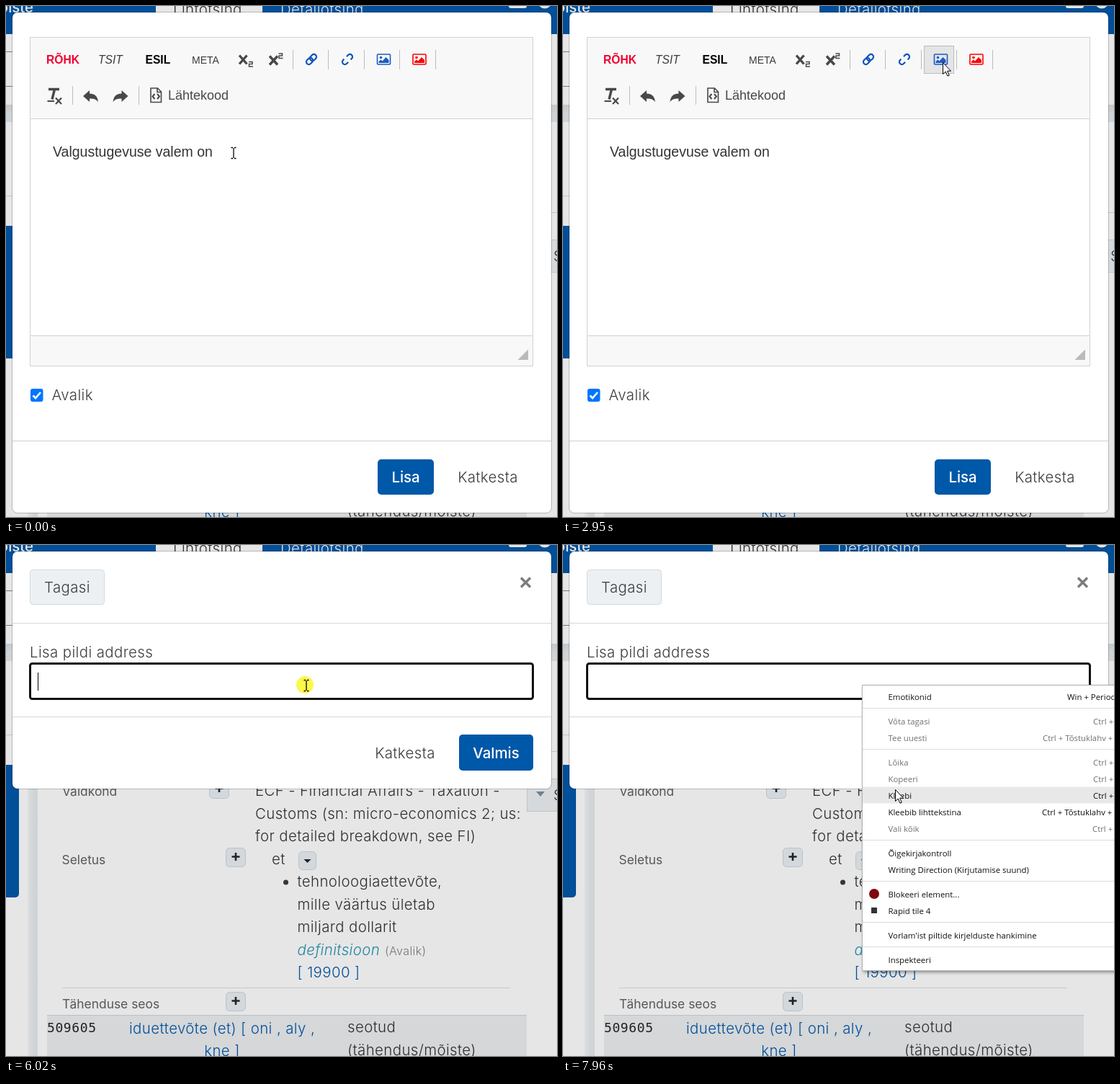
An HTML page that plays this animation: 765 px wide and 709 px high, repeating every 8 s.

```html
<!DOCTYPE html>
<html lang="et">
<head>
<meta charset="utf-8">
<title>Pildi lisamine</title>
<style>
  html, body { margin: 0; width: 100%; height: 100%; overflow: hidden; background: #e6e6e6; }
  svg { display: block; width: 765px; height: 709px; }
  text { font: 350 20.4px Inter, sans-serif; font-optical-sizing: none; letter-spacing: .4px; fill: #3a3c3e; white-space: pre; }
  .label, .strong, .editor text, .menu text { letter-spacing: 0; font-weight: 400; }
  .mid { text-anchor: middle; }
  .white { fill: #fff; }
  .strong { font-weight: 500; }
  .label { font-size: 17.4px; }
  .page text { fill: #2c2f32; }
  .page .label { fill: #55585a; }
  .page .link { fill: #004f98; }
  .page .head { fill: #e6e6e6; }
  .page .def { fill: #1f86a0; font-style: italic; }
  .page .note { font-size: 16px; fill: #707477; }
  .page .code { font: 18px "DejaVu Sans Mono", monospace; letter-spacing: .6px; fill: #222; }
  .editor text { font-family: "Liberation Sans", Arial, sans-serif; }
  .editor .tool { font-size: 15.6px; }
  .editor .bold { font-weight: bold; }
  .menu text { font: 11.4px "Open Sans", sans-serif; fill: #111; }
  .menu .off { fill: #707070; }
  .line { fill: none; stroke: #d1d1d1; }
  .sep { fill: none; stroke: #bcbcbc; }
  .rule { stroke: #d0d9df; }
  .chip { fill: #d3d8dc; stroke: #b8c3cb; }
  .icon { fill: none; stroke: #484848; stroke-width: 2; }
  .panel { fill: #fff; }
  .frame { fill: none; stroke: #000; stroke-opacity: .2; }
</style>
</head>
<body>
<svg viewBox="0 0 765 709">
  <defs>
    <linearGradient id="band" x2="0" y2="1">
      <stop stop-color="#c4c6c8"/><stop offset=".5" stop-color="#ced3d7"/>
    </linearGradient>
    <linearGradient id="gutter">
      <stop stop-color="#dcdee0"/><stop offset=".5" stop-color="#d2d5d7"/><stop offset="1" stop-color="#cfd3d5"/>
    </linearGradient>
    <filter id="shadow" x="-5%" y="-5%" width="115%" height="115%">
      <feDropShadow dx="2" dy="2" stdDeviation="2" flood-opacity=".4"/>
    </filter>
    <g id="plus">
      <rect class="chip" x=".5" y=".5" width="27" height="26" rx="5"/>
      <path d="M14 7v11M8.5 12.5h11" stroke="#222" stroke-width="2.6"/>
    </g>
    <g id="picture">
      <rect x="1" y="1" width="18" height="14" rx="1" fill="none" stroke="currentColor" stroke-width="1.6"/>
      <circle cx="6" cy="5.5" r="1.8" fill="currentColor"/>
      <path d="M3 13V11L6 8.5L8 10.5L13 5L17 9V13Z" fill="currentColor"/>
    </g>
    <path id="reply" d="M0 8L9 0V4.5C16 4.5 20 8 21 16C18 12 14 11 9 11.5V16Z" fill="#484848"/>
  </defs>

  <g class="page">
    <rect width="765" height="709" fill="#e6e6e6"/>
    <rect width="765" height="39" fill="#004f98"/>
    <path d="M208 0h148v39H208z" fill="#e6e6e6"/>
    <text class="head strong" x="38" y="9" text-anchor="end">mõiste</text>
    <text x="232" y="12">Lihtotsing</text>
    <text class="head" x="381" y="12">Detailotsing</text>
    <rect x="698" y="-12" width="25" height="15" rx="3" fill="#e6e6e6"/>
    <circle cx="748" cy="-6" r="9.5" fill="#e6e6e6"/>
    <path d="M0 63.5H20M0 111.5H20" stroke="#777"/>
    <rect y="137" width="765" height="24" fill="url(#band)"/>
    <path d="M0 263.5H30M745 286.5H765" stroke="#c0c4c7"/>
    <path d="M0 305H18V484a5 5 0 0 1-5 5H0z" fill="#004f98"/>
    <rect x="30" y="161" width="14" height="548" fill="url(#gutter)"/>
    <rect x="723.5" y="324.5" width="60" height="45" fill="#d5d9dc" stroke="#bec5ca"/>
    <path d="M736 342h12l-6 7z" fill="#70818c"/>
    <text x="760" y="354">S</text>

    <text class="label" x="78" y="348">Valdkond</text>
    <use href="#plus" x="282" y="325"/>
    <text x="346" y="348">ECF - Financial Affairs - Taxation -</text>
    <text x="346" y="380">Customs (sn: micro-economics 2; us:</text>
    <text x="346" y="411">for detailed breakdown, see FI)</text>
    <text class="label" x="77.5" y="443">Seletus</text>
    <use href="#plus" x="305" y="420"/>
    <text x="369" y="443">et</text>
    <rect class="chip" x="406.5" y="425.5" width="24" height="25" rx="5"/>
    <path d="M413.5 436h10l-5 5z" fill="#222"/>
    <circle cx="388.5" cy="468" r="3.5" fill="#33373a"/>
    <text x="404.5" y="474">tehnoloogiaettevõte,</text>
    <text x="404.5" y="505.5">mille väärtus ületab</text>
    <text x="404.5" y="537">miljard dollarit</text>
    <text class="def" x="404.5" y="569">definitsioon</text>
    <text class="note" x="526" y="569">(Avalik)</text>
    <text class="link" x="404.5" y="600">[ 19900 ]</text>
    <path d="M78 614.5H700" stroke="#c3c8cb"/>
    <text class="label" x="78" y="643">Tähenduse seos</text>
    <use href="#plus" x="305" y="620"/>
    <rect x="57" y="653" width="666" height="56" fill="#d5d7d9"/>
    <path d="M57 652.5H723" stroke="#b4c2cc"/>
    <text class="code" x="57" y="676">509605</text>
    <text class="link mid" x="300" y="678">iduettevõte (et) [ oni , aly ,</text>
    <text class="link mid" x="300" y="709">kne ]</text>
    <text x="474" y="676">seotud</text>
    <text x="474" y="708">(tähendus/mõiste)</text>
  </g>

  <g id="editorDialog">
    <rect class="panel" x="9" y="9" width="748" height="694" rx="7"/>
    <rect class="frame" x="8.5" y="8.5" width="749" height="695" rx="7.5"/>
    <path d="M34 44H731V156H34zM34 458H731V499H34z" fill="#f8f8f8"/>
    <path class="line" d="M33.5 43.5H731.5V499.5H33.5zM34 156.5H731M34 457.5H731"/>
    <path d="M725 476.5V491H710.5z" fill="#bababa"/>
    <path class="sep" d="M398.5 61v27M447.5 61v27M497.5 61v27M546.5 61v27M596.5 61v27M92.5 111v26M184.5 111v26"/>
    <g class="editor">
      <text class="tool bold" x="56" y="80" style="fill:#f00030">RÕHK</text>
      <text class="tool" x="128" y="80" style="font-style:italic">TSIT</text>
      <text class="tool bold" x="193.5" y="80" style="fill:#000">ESIL</text>
      <text x="258" y="80" style="font-size:14px">META</text>
      <text x="225" y="130" style="font-size:18px;fill:#484848">Lähtekood</text>
      <text x="65" y="209" style="font-size:19.5px;fill:#333">Valgustugevuse valem on</text>
    </g>
    <g class="icon">
      <path d="M324 68.5L334.5 80.5M334.5 68.5L324 80.5M366 69.5L377 81.5M377 69.5L366 81.5" stroke-width="3.4"/>
      <path d="M337 77.5h5v3h-4.5v3.5h5.5M378.5 66h5v3h-4.5v3.5h5.5" stroke-width="1.5"/>
      <path d="M59 115.5H74M67.5 115.5L64 129.5" stroke-width="3.4"/>
      <path d="M57.5 132H67M69 127.5L77 136M77 127.5L69 136" stroke-width="2.2"/>
      <path d="M201 114H210.5L215.5 119V133.5H201zM210 114V119.5H215.5" stroke-width="1.6"/>
      <path d="M206.5 122L203.5 125.5L206.5 129M210 122L213 125.5L210 129"/>
    </g>
    <g fill="none" stroke="#0f55bd" stroke-width="2.2">
      <g transform="translate(424 74) rotate(-45)">
        <rect x="-8.5" y="-3.5" width="10" height="7" rx="3.5"/>
        <rect x="-1.5" y="-3.5" width="10" height="7" rx="3.5"/>
      </g>
      <g transform="translate(474 74) rotate(-45)">
        <path d="M-3 -3.5H-5a3.5 3.5 0 0 0 0 7H-2M2 -3.5H5a3.5 3.5 0 0 1 0 7H3"/>
      </g>
    </g>
    <use href="#reply" x="107" y="117"/>
    <use href="#reply" transform="translate(169.5 117) scale(-1 1)"/>
    <rect id="toolHover" x="501.5" y="55.5" width="41" height="38" fill="#e5e5e5" stroke="#bcbcbc"/>
    <use href="#picture" x="514.5" y="66" color="#1a5bc4"/>
    <use href="#picture" x="564" y="66" color="#f00"/>
    <path id="editorCaret" d="M292.5 191v22" stroke="#000"/>
    <rect x="34" y="531" width="17.5" height="18" rx="3" fill="#0075ff"/>
    <path d="M37.5 540.5l3.5 3.5l7-8" fill="none" stroke="#fff" stroke-width="2.6"/>
    <text x="63.5" y="547">Avalik</text>
    <path class="line" d="M9 603.5H757"/>
    <rect x="516" y="629" width="78" height="49" rx="5" fill="#0058a9"/>
    <text class="white strong mid" x="555" y="661">Lisa</text>
    <text class="mid" x="669" y="661">Katkesta</text>
  </g>

  <g id="addressDialog">
    <rect class="panel" x="9" y="9" width="748" height="329" rx="7"/>
    <rect class="frame" x="8.5" y="8.5" width="749" height="330" rx="7.5"/>
    <path class="rule" d="M9 108.5H757M9 238.5H757"/>
    <rect x="33.5" y="34.5" width="103" height="48" rx="4" fill="#edf0f2" stroke="#cddae1"/>
    <text class="mid" x="85" y="66">Tagasi</text>
    <path d="M715 45.5L728 58.5M728 45.5L715 58.5" stroke="#7c7c7c" stroke-width="3.4"/>
    <text x="33" y="156">Lisa pildi address</text>
    <rect id="plainField" x="33.5" y="164.5" width="698" height="49" rx="3" fill="#fff" stroke="#666"/>
    <rect id="focusField" x="33.5" y="164.5" width="698" height="49" rx="3" fill="#fff" stroke="#101010" stroke-width="3"/>
    <path id="fieldCaret" d="M44.5 177v25" stroke="#000"/>
    <text class="mid" x="554" y="296">Katkesta</text>
    <rect x="629" y="263" width="103" height="50" rx="5" fill="#0058a9"/>
    <text class="white strong mid" x="680.5" y="296">Valmis</text>
  </g>

  <g id="menu" class="menu">
    <rect x="415.5" y="194.5" width="380" height="396" fill="#fff" stroke="#b4b4b4" filter="url(#shadow)"/>
    <rect id="rowHover" x="416" width="349" height="23" fill="#e8e8e8"/>
    <path d="M416 226.5H765M416 283.5H765M416 409.5H765M416 466.5H765M416 523.5H765M416 557.5H765" stroke="#dcdcdc"/>
    <circle cx="432" cy="484" r="7" fill="#800610"/>
    <rect x="428" y="503" width="8" height="8" fill="#333"/>
  </g>

  <circle id="glow" r="12" fill="#fbf84c" style="mix-blend-mode:multiply"/>
  <g id="pointer">
    <path id="arrow" d="M.5 .5V16.5L4.2 13L7 19.2L9.3 18.2L6.6 12.2H11.5Z" fill="#fff" stroke="#000"/>
    <path id="beam" d="M-1.5 -6.5H1M3 -6.5H5.5M2 -6V8M-1.5 8.5H1M3 8.5H5.5" stroke="#000" stroke-width="1.3"/>
  </g>
</svg>
<script>
const LOOP = 8000;
const el = id => document.getElementById(id);
const show = (id, on) => el(id).style.display = on ? '' : 'none';
const within = (v, from, to) => v >= from && v < to;

// Row centre, label, shortcut, shortcut x, disabled
const rows = [
  [210, 'Emotikonid', 'Win + Period', 700],
  [244, 'Võta tagasi', 'Ctrl + Z', 736, true],
  [267, 'Tee uuesti', 'Ctrl + Tõstuklahv + Z', 666, true],
  [301, 'Lõika', 'Ctrl + X', 736, true],
  [324, 'Kopeeri', 'Ctrl + C', 736, true],
  [347, 'Kleebi', 'Ctrl + V', 736],
  [370, 'Kleebib lihttekstina', 'Ctrl + Tõstuklahv + V', 665],
  [393, 'Vali kõik', 'Ctrl + A', 735, true],
  [427, 'Õigekirjakontroll'],
  [450, 'Writing Direction (Kirjutamise suund)'],
  [484, 'Blokeeri element...'],
  [507, 'Rapid tile 4'],
  [541, "Vorlam'ist piltide kirjelduste hankimine"],
  [575, 'Inspekteeri']
];

function addText(x, y, content, off) {
  const node = document.createElementNS('http://www.w3.org/2000/svg', 'text');
  node.setAttribute('x', x);
  node.setAttribute('y', y);
  if (off) node.setAttribute('class', 'off');
  node.textContent = content;
  el('menu').append(node);
}
for (const [y, label, keys, x, off] of rows) {
  addText(451.5, y + 4.5, label, off);
  if (keys) addText(x, y + 4.5, keys, off);
}

// Pointer hot spot: time, x, y
const path = [
  [0, 313.5, 203], [789, 313.5, 203], [790, 316.5, 202], [1130, 316.5, 202],
  [1500, 395, 160], [1930, 477, 117], [2070, 500, 106], [2400, 520, 88],
  [2750, 527, 79], [3080, 526.5, 77], [4880, 526.5, 77], [5220, 415, 194],
  [7500, 415, 194], [7700, 436, 252], [7960, 461, 339], [8000, 461, 339]
];

function pointerAt(t) {
  const i = path.findIndex(p => p[0] > t);
  const [t0, x0, y0] = path[i - 1], [t1, x1, y1] = path[i];
  const k = (t - t0) / (t1 - t0);
  return [x0 + (x1 - x0) * k, y0 + (y1 - y0) * k];
}

function draw(t) {
  const [x, y] = pointerAt(t);
  const address = t >= 4540, menu = t >= 7430;
  const overText = address
    ? t < 7230 && within(y, 164, 214)
    : within(y, 157, 457);

  show('editorDialog', !address);
  show('addressDialog', address);
  show('toolHover', within(x, 501, 543) && within(y, 55, 94));
  show('editorCaret', within(t, 3740, 4270));
  show('plainField', t < 6020);
  show('focusField', t >= 6020);
  show('fieldCaret', within(t, 6020, 6490) || within(t, 7030, 7560));

  show('menu', menu);
  const row = rows.find(r => Math.abs(r[0] - y) <= 11.5);
  show('rowHover', menu && x > 416 && row);
  if (row) el('rowHover').setAttribute('y', row[0] - 11.5);

  show('glow', within(t, 3740, 4540) || within(t, 6020, 6490));
  el('glow').setAttribute('transform', `translate(${x} ${y})`);
  show('arrow', !overText);
  show('beam', overText);
  el('pointer').setAttribute('transform', `translate(${Math.round(x)} ${Math.round(y)})`);
}

function tick() {
  draw(performance.now() % LOOP);
  requestAnimationFrame(tick);
}
tick();
</script>
</body>
</html>
```
